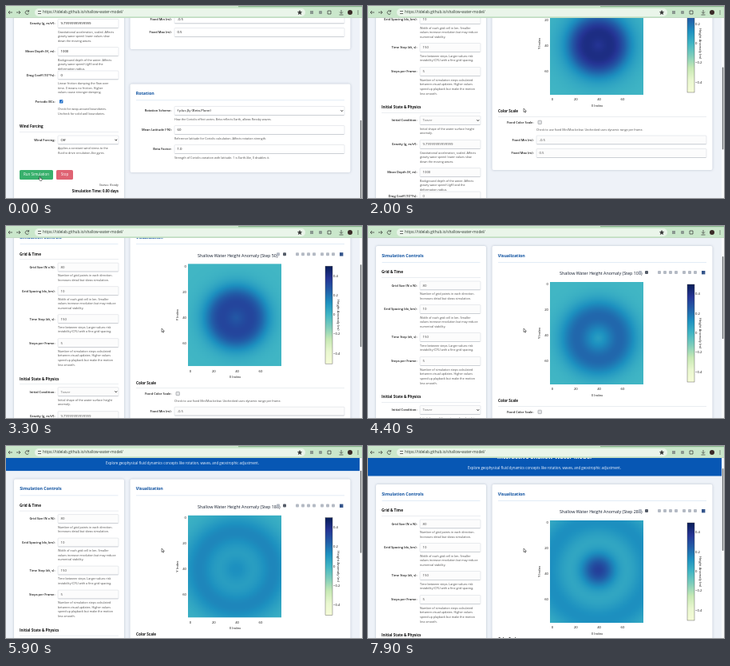
Recreate the animation shown at these times as an HTML page with a canvas. Size 446 by 240 pixels, loop 8 s.

```html
<!DOCTYPE html>
<html lang="en">
<head>
<meta charset="utf-8">
<title>Interactive Shallow Water Model</title>
<style>
  html, body { margin: 0; width: 100%; height: 100%; overflow: hidden; }
  body { position: relative; background: #eef2f8; }
  #page, #chrome { position: absolute; left: 0; top: 0; }
  #page { width: 446px; height: 520px; }
  svg { position: absolute; left: 0; top: 0; display: block; }
  #sea { position: absolute; left: 228px; top: 92.5px; width: 117px; height: 128.5px; }
  text { font-family: "Open Sans", "Noto Sans", sans-serif; font-size: 4.3px; fill: #111; }
  .h1 { font-size: 7.3px; font-weight: 700; fill: #fff; }
  .sub { font-size: 4.4px; fill: #f2f7ff; }
  .h2 { font-size: 5.3px; font-weight: 700; fill: #0b4f9f; }
  .h3 { font-size: 4.6px; font-weight: 700; fill: #111; }
  .label { fill: #1a1a1a; font-weight: 600; font-size: 4px; }
  .help { font-size: 3.7px; fill: #4c4c4c; }
  .title { font-size: 5.4px; font-weight: 500; fill: #111b2c; }
  .axis { font-size: 4.2px; fill: #111; }
  .button { font-size: 4.5px; fill: #fff; }
  .status { font-size: 4.1px; font-style: italic; fill: #444; }
  .clock { font-size: 4.4px; font-weight: 700; fill: #111; }
  .url { font-size: 4.7px; fill: #2c382f; }
  .card { fill: #fff; filter: drop-shadow(0 .8px 1.4px #7f90a480); }
  .box { fill: #fff; stroke: #d3d7dc; stroke-width: .5px; }
  .check { fill: #fff; stroke: #8d9196; stroke-width: .6px; }
  .tick { fill: #0b62c4; }
  .running .box { fill: #fcfcfc; }
  .running .value { fill: #444; }
  .running .choice { fill: #777; }
  .running .check { fill: #e4e5e7; }
  .running .tick { fill: #b4b8be; }
</style>
</head>
<body>
<div id="page">
  <svg id="sheet" width="446" height="520"></svg>
  <canvas id="sea" width="80" height="80"></canvas>
</div>
<svg id="chrome" width="446" height="240"></svg>
<script>
const LOOP = 8000, STEP = 100;
const START = 500;
const $ = id => document.getElementById(id);

function add(parent, name, attrs, content) {
  const el = document.createElementNS("http://www.w3.org/2000/svg", name);
  for (const key in attrs) el.setAttribute(key, attrs[key]);
  if (content !== undefined) el.textContent = content;
  parent.appendChild(el);
  return el;
}

const sheet = $("sheet"), chrome = $("chrome");
const rect = (x, y, width, height, more, parent = sheet) =>
  add(parent, "rect", { x, y, width, height, ...more });
const path = (d, more, parent = sheet) =>
  add(parent, "path", { d, fill: "none", stroke: "#333", "stroke-width": .7, ...more });
// y is the middle of the lowercase letters
const text = (x, y, cls, content, anchor = "start", parent = sheet) =>
  add(parent, "text", { x, y: y + 1.4, class: cls, "text-anchor": anchor }, content);
const rule = (x, y, width, color = "#dde2e8") => rect(x, y, width, .6, { fill: color });

function help(x, y, lines) {
  lines.forEach((line, i) => text(x, y + i * 5.6, "help", line));
}

function field(wide, y, label, value, lines, kind = "input") {
  const x = wide ? 211 : 65, right = wide ? 424 : 141;
  text(x - 3.5, y, "label", label, "end");
  if (kind === "check") {
    rect(x + 2, y - 2.3, 4.4, 4.4, { rx: .7, class: value ? "tick" : "check" });
    if (value) path(`M${x + 3} ${y}l1 1l1.5-2.4`, { stroke: "#fff" });
  } else {
    rect(x, y - 5.5, right - x, 11, { rx: 1, class: "box" });
    rule(x + .5, y + 5, right - x - 1, "#b9bec5");
    text(x + 3.5, y, kind === "select" ? "choice" : "value", value);
    if (kind === "select")
      path(`M${right - 4.5} ${y - .7}l1.3 1.4l1.3-1.4`, { stroke: "#111", "stroke-width": .9 });
  }
  help(x, y + (kind === "check" ? 9 : 10.3), lines);
}

function section(x, y, name, width) {
  text(x, y, "h3", name);
  rule(x, y + 6.2, width);
}

function panel(x, y, width, height, name) {
  rect(x, y, width, height, { rx: 2, class: "card" });
  text(x + 7.2, y + 12.4, "h2", name);
  rule(x + 7.5, y + 20, width - 15, "#cfdff0");
}

// Header
rect(0, 0, 443, 37.5, { fill: "#0757b4" });
text(221, 15, "h1", "Interactive Shallow Water Model", "middle");
text(221, 28, "sub", "Explore geophysical fluid dynamics concepts like rotation, waves, and geostrophic adjustment.", "middle");

// Controls
panel(10, 48, 138, 466, "Simulation Controls");
section(17, 81, "Grid & Time", 124);
field(false, 97.5, "Grid Size (N x N):", "80", ["Number of grid points in each direction.", "Increases detail but slows simulation."]);
field(false, 127, "Grid Spacing (dx, km):", "10", ["Width of each grid cell in km. Smaller", "values increase resolution but may reduce", "numerical stability."]);
field(false, 162, "Time Step (dt, s):", "150", ["Time between steps. Larger values risk", "instability (CFL) with a fine grid spacing."]);
field(false, 192, "Steps per Frame:", "5", ["Number of simulation steps calculated", "between visual updates. Higher values", "speed up playback but make the motion", "less smooth."]);
section(17, 237, "Initial State & Physics", 124);
field(false, 253, "Initial Condition:", "Tower", ["Initial shape of the water surface height", "anomaly."], "select");
field(false, 283, "Gravity (g, m/s²):", "9.79999999999999", ["Gravitational acceleration, scaled. Affects", "gravity wave speed: lower values slow", "down the moving waves."]);
field(false, 318, "Mean Depth (H, m):", "1000", ["Background depth of the water. Affects", "gravity wave speed (√gH) and the", "deformation radius."]);
field(false, 347.5, "Drag Coeff (10⁻⁶/s):", "0", ["Linear friction damping the flow over", "time. 0 means no friction. Higher", "values cause stronger damping."]);
field(false, 380.5, "Periodic BCs:", true, ["Check for wrap-around boundaries.", "Uncheck for solid wall boundaries."], "check");
section(17, 412, "Wind Forcing", 124);
field(false, 428.5, "Wind Forcing:", "Off", ["Applies a constant wind stress to the", "fluid to drive circulation-like gyres."], "select");
rect(17, 466, 42, 12, { rx: 1.6, fill: "#38b06c" });
text(38, 472, "button", "Run Simulation", "middle");
const stop = rect(63, 466, 21, 12, { rx: 1.6, fill: "#d9485a" });
text(73.5, 472, "button", "Stop", "middle");
const status = text(141, 485, "status", "", "end");
const clock = text(141, 493, "clock", "", "end");

// Visualization
panel(155.5, 48, 276, 267, "Visualization");
const title = text(240, 83, "title", "");
for (const x of [341, 349, 365, 372, 379, 386, 396, 403, 410])
  rect(x - 2, 79, 4, 4, { rx: 1, fill: x === 349 ? "#555c68" : "#b4bac4" });
rect(418, 79, 4.4, 4.4, { fill: "#34558b" });
for (let i = 0; i < 4; i++) {
  const x = 231 + i * 29.3, y = 96 + i * 32;
  text(x, 227, "axis", i * 20, "middle");
  text(226, y, "axis", i * 20, "end");
}
text(287, 234.5, "axis", "X Index", "middle");
const turned = (x, y, angle, content) =>
  text(0, 0, "axis", content, "middle").setAttribute("transform", `translate(${x} ${y}) rotate(${angle})`);
turned(215, 157, -90, "Y Index");
turned(416.5, 157, 90, "Height Anomaly (m)");

const scale = ["#f6fcd8", "#e9f7cf", "#c7e9b4", "#7fcdbb", "#41b6c4", "#1d91c0", "#225ea8", "#253494", "#081d58"];
const ramp = add(sheet, "linearGradient", { id: "ramp", x1: 0, x2: 0, y1: 1, y2: 0 });
scale.forEach((color, i) => add(ramp, "stop", { offset: i / 8, "stop-color": color }));
rect(400, 96, 9, 122, { fill: "url(#ramp)", stroke: "#444", "stroke-width": .4 });
["0.4", "0.2", "0", "−0.2", "−0.4"].forEach((v, i) => text(410, 108 + i * 24.3, "axis", v));

section(163, 242, "Color Scale", 261);
field(true, 255.5, "Fixed Color Scale:", false, ["Check to use fixed Min/Max below. Unchecked uses dynamic range per frame."], "check");
field(true, 277.5, "Fixed Min (m):", "-0.5", []);
field(true, 294, "Fixed Max (m):", "0.5", []);

// Rotation
panel(155.5, 358.5, 276, 110.5, "Rotation");
field(true, 392, "Rotation Scheme:", "f plus βy (Beta-Plane)", ["How the Coriolis effect varies. Beta reflects Earth, allows Rossby waves."], "select");
field(true, 416, "Mean Latitude (°N):", "60", ["Reference latitude for Coriolis calculation. Affects rotation strength."]);
field(true, 440, "Beta Factor:", "1.0", ["Strength of Coriolis variation with latitude. 1 is Earth-like, 0 disables it."]);

// Browser bar, scrollbar and pointer
const bar = (...args) => rect(...args, chrome);
bar(0, 0, 446, 15, { fill: "#cae7cb" });
bar(291, 0, 155, 1.2, { fill: "#86b38a" });
bar(36, 3, 339, 10, { rx: 5, fill: "#eaf5ea" });
bar(0, 14.5, 446, .5, { fill: "#b9cdbb" });
path("M8 8H3M5 6L3 8l2 2M13 8h5M16 6l2 2l-2 2M28.5 7a2.3 2.3 0 1 0 0 2.2M28.6 5v2h-2", {}, chrome);
path("M40 6.5h4M40 9.5h4", {}, chrome);
text(46, 8, "url", "https://tidelab.github.io/shallow-water-model/", "start", chrome);
path("M368 5.5l.8 1.7l1.8.2l-1.3 1.2l.4 1.9l-1.7-1l-1.7 1l.4-1.9l-1.3-1.2l1.8-.2z", { "stroke-width": .5, fill: "#333" }, chrome);
bar(381, 6, 4, 4, { fill: "#8a9890" });
bar(392, 6, 4, 4, { rx: 1, fill: "#8a9890" });
path("M403 6h4v4h-4zM420 5v4M418 7.5l2 2l2-2M417.5 11h5", {}, chrome);
add(chrome, "circle", { cx: 431, cy: 8, r: 3, fill: "#3a2a28" });
for (const y of [6, 8, 10]) add(chrome, "circle", { cx: 441, cy: y, r: .6, fill: "#222" });
bar(443, 15, 3, 225, { fill: "#f8f9fa" });
const thumb = bar(443.8, 28, 1.5, 103, { rx: .7, fill: "#6c7074" });
const arrow = path("M0 0v4.6l1.1-1l.8 1.7l.8-.4l-.8-1.6h1.5z", { fill: "#fff", stroke: "#111", "stroke-width": .5 }, chrome);
const hand = path("M1 0v3L0 2.6L1.4 5.4h2.4L4.3 2.8L2 2.2V0z", { fill: "#fff", stroke: "#111", "stroke-width": .5 }, chrome);

// Rows of [time, ...values], blended linearly
function blend(rows, t) {
  let i = 1;
  while (i < rows.length - 1 && rows[i][0] < t) i++;
  const a = rows[i - 1], b = rows[i];
  const k = Math.min(1, Math.max(0, (t - a[0]) / (b[0] - a[0])));
  return a.slice(1).map((v, j) => v + (b[j + 1] - v) * k);
}

const scroll = [[0, 261], [800, 261], [1400, 178], [2000, 110], [2600, 50], [3100, 50],
  [4400, 23], [5300, 16], [6300, 0], [8000, 0]];
const pointer = [[0, 41, 213], [500, 41, 213], [1100, 195, 128], [8000, 195, 128]];
// base, core height, core width, ring height, ring radius, ring width, centre y
const waves = [
  [0, .5, .36, 26, .13, 22, 12, 2],
  [2700, .5, .34, 27, .14, 22, 12, 2],
  [4400, .5, .04, 16, .22, 28, 15, 6],
  [5300, .51, .02, 15, .16, 40, 15, 9],
  [6600, .52, .22, 12, .11, 54, 16, -3],
  [7900, .51, .33, 15, .12, 62, 15, -2],
  [8000, .51, .34, 15, .12, 63, 15, -2]
];

const rgb = scale.map(c => [1, 3, 5].map(i => parseInt(c.slice(i, i + 2), 16)));
const pen = $("sea").getContext("2d");
const image = pen.createImageData(80, 80);
const bell = (x, w) => Math.exp(-x * x / (2 * w * w));

function drawSea(t) {
  const [base, core, coreW, ring, radius, ringW, cy] = blend(waves, t);
  for (let p = 0; p < 6400; p++) {
    const x = (p % 80 - 39.5) * 1.46 - 2;
    const y = (Math.floor(p / 80) - 39.5) * 1.6 - cy;
    const r = Math.hypot(x, y);
    const h = base + core * bell(r, coreW) + ring * bell(r - radius, ringW);
    const s = Math.min(7.999, Math.max(0, h * 8)), n = Math.floor(s);
    for (let c = 0; c < 3; c++)
      image.data[p * 4 + c] = rgb[n][c] + (rgb[n + 1][c] - rgb[n][c]) * (s - n);
    image.data[p * 4 + 3] = 255;
  }
  pen.putImageData(image, 0, 0);
}

let shown = -1;
function draw(now) {
  const t = Math.floor(now % LOOP / STEP) * STEP;
  if (t !== shown) {
    shown = t;
    const [top] = blend(scroll, t), [px, py] = blend(pointer, t);
    const running = t >= START;
    const count = Math.max(0, (t - 2300) / STEP) * 5;
    $("page").style.transform = `translateY(${-top}px)`;
    thumb.setAttribute("y", 28 + top * .44);
    sheet.classList.toggle("running", running);
    stop.setAttribute("opacity", running ? 1 : .85);
    status.textContent = running ? "Status: Running" : "Status: Ready";
    clock.textContent = `Simulation Time: ${(count * 150 / 86400).toFixed(2)} days`;
    title.textContent = `Shallow Water Height Anomaly (Step ${count})`;
    const over = px < 59 && py > 204;
    hand.setAttribute("visibility", over ? "visible" : "hidden");
    arrow.setAttribute("visibility", over ? "hidden" : "visible");
    for (const el of [hand, arrow]) el.setAttribute("transform", `translate(${px} ${py})`);
    drawSea(t);
  }
  requestAnimationFrame(draw);
}
requestAnimationFrame(draw);
</script>
</body>
</html>
```
